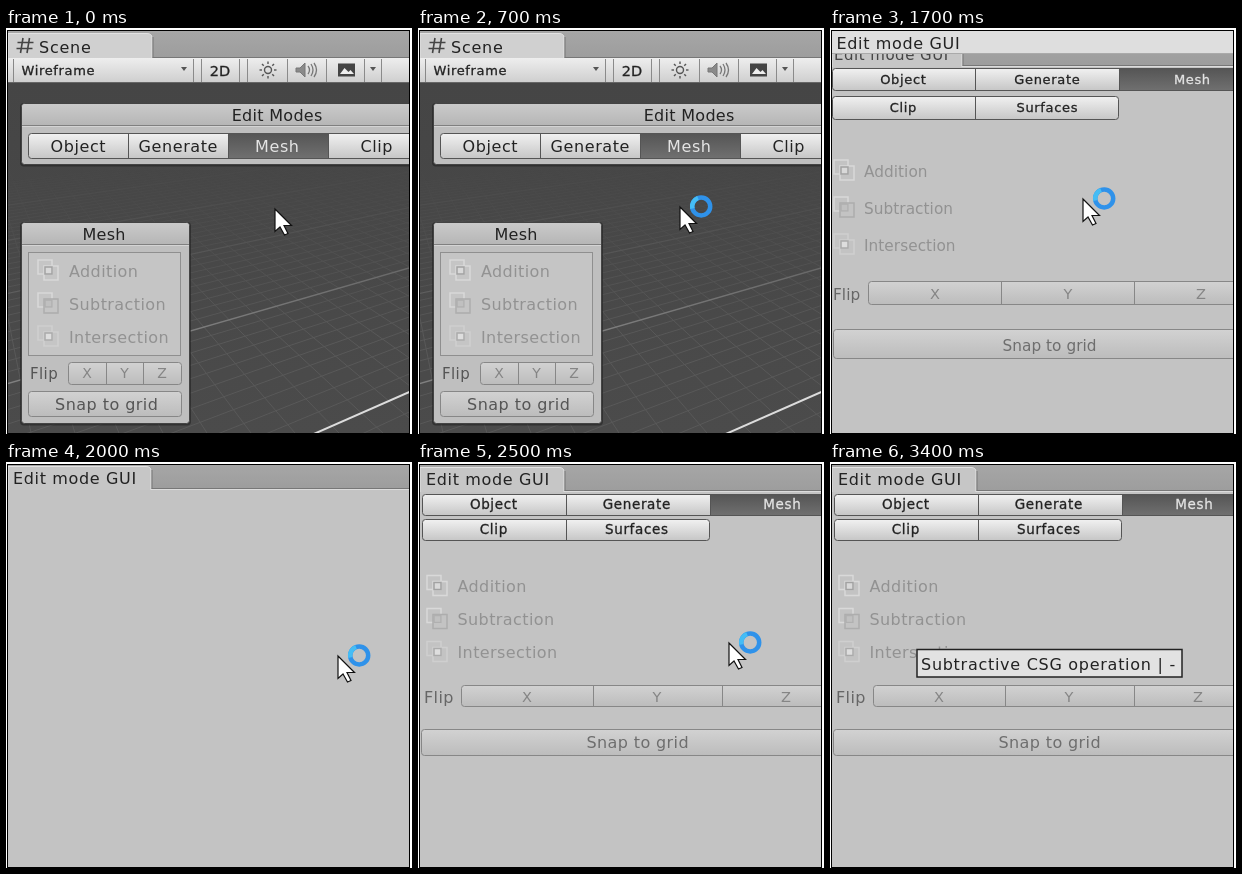
An HTML page for the animation above (3500 ms loop, 406 by 406 pixels).

```html
<!DOCTYPE html>
<html lang="en">
<head>
<meta charset="utf-8">
<title>Editor window</title>
<style>
html, body { margin: 0; width: 100%; height: 100%; overflow: hidden; background: #fff; }
svg { display: block; width: 100%; height: 100%; }
text { font-family: "DejaVu Sans", sans-serif; }
.heavy { stroke: currentColor; stroke-width: .3; }
</style>
</head>
<body>
<svg id="stage" viewBox="0 0 406 406"></svg>
<script>
const LOOP = 3500;

// Each step holds until the next: time, scene, cursor x, cursor y, busy ring
const steps = [
  [0, "panels", 269, 181, 0],
  [100, "panels", 267, 183, 0],
  [600, "panels", 267, 183, 1],
  [700, "panels", 262, 179, 1],
  [800, "view", 257, 175, 1],
  [900, "opening"],
  [1000, "window"],
  [1700, "stretched", 253, 171, 1],
  [1800, "stretched", 279, 179, 1],
  [1900, "stretched", 306, 186, 1],
  [2000, "blank", 332, 194, 1],
  [2300, "docked", 325, 190, 1],
  [2400, "docked", 318, 185, 1],
  [2500, "docked", 311, 181, 1],
  [2800, "docked", 329, 173, 1],
  [2900, "tooltip"]
];

const INK = "#222", DIM = "#929292", BODY = "#c3c3c3";

const rect = (x, y, r, b, fill, more = "") =>
  `<rect x="${x}" y="${y}" width="${r - x}" height="${b - y}" fill="${fill}" ${more}/>`;
const path = (d, stroke, width = 1, fill = "none") =>
  `<path d="${d}" fill="${fill}" stroke="${stroke}" stroke-width="${width}"/>`;

// y is the middle of the capital letters
function text(s, x, y, { size = 16, gap = .4, color = INK, anchor = "start", heavy = false } = {}) {
  const shift = anchor === "middle" ? gap / 2 : 0;
  return `<text x="${x + shift}" y="${y + size * .365}" font-size="${size}" letter-spacing="${gap}"
    fill="${color}" text-anchor="${anchor}" ${heavy ? `class="heavy" style="color:${color}"` : ""}>${s}</text>`;
}
const mid = (s, x, y, opts) => text(s, x, y, { ...opts, anchor: "middle" });

// Joined row of buttons; edges are the x positions of the borders
function buttons(edges, y, b, labels,
  { on = -1, off = false, ink = off ? "#858585" : INK, cy = (y + b) / 2, centers = [], ...font } = {}) {
  const x = edges[0], r = edges[edges.length - 1];
  const line = off ? "#878787" : "#555";
  let s = rect(x + .5, y + .5, r + .5, b + .5, off ? "url(#soft)" : "url(#button)", 'rx="3"');
  if (on >= 0) s += rect(edges[on], y + .5, edges[on + 1] + .5, b + .5, "url(#pressed)", 'rx="2"');
  edges.slice(1, -1).forEach(e => s += path(`M${e + .5} ${y + .5}V${b}`, line));
  s += rect(x + .5, y + .5, r + .5, b + .5, "none", `rx="3" stroke="${line}"`);
  labels.forEach((label, i) => {
    const cx = centers[i] ?? (edges[i] + edges[i + 1]) / 2;
    s += mid(label, cx, cy, { color: i === on ? "#e4e4e4" : ink, ...font });
  });
  return s;
}

// Two overlapping squares
function icon(x, y, kind) {
  const square = (p, size, stroke, fill = "none") =>
    rect(x + p, y + p, x + p + size, y + p + size, fill, `stroke="${stroke}" stroke-width="1.5"`);
  const [back, front, edge, core] = [
    ["#d9d9d9", "#d9d9d9", "#a2a2a2", "#d9d9d9"],
    ["#d9d9d9", "#adadad", "#b0b0b0", "#c0c0c0"],
    ["#cfcfcf", "#cfcfcf", "#ababab", "#dedede"]
  ][kind];
  return square(1, 14, back) + square(7, 14, front) + square(8, 7, edge, core);
}

const operations = (iconX, textX, ys, font) =>
  ["Addition", "Subtraction", "Intersection"].map((name, i) =>
    icon(iconX, ys[i] - 12, i) + text(name, textX, ys[i], { color: DIM, ...font })).join("");

const tab = (r, y, b, fill = "#c6c6c6") =>
  rect(2, 3, 403, b, "url(#tabs)") +
  path(`M2 ${b - .5}H403`, "#777") + path(`M${r} ${b + .5}H403`, "#dcdcdc") +
  path(`M2 ${b + 1}V${y + .5}H${r - 5}Q${r} ${y + .5} ${r} ${y + 5}V${b + 1}`, "#e2e2e2", 1, fill) +
  path(`M${r + 1} ${y + 4}V${b}`, "#777");

function grid() {
  const horizon = 5, low = 405;
  const ray = (vx, x, color, width = 1) =>
    path(`M${vx} ${horizon}L${x + (x - vx) * .2} ${low + (low - horizon) * .2}`, color, width);
  let s = "";
  for (let k = -6; k < 50; k++) {
    if (k % 10) s += ray(1219, 310 - 48 * k, "#595959");
  }
  for (let j = -4; j < 45; j++) s += ray(-55, 157 + 44 * j, "#595959");
  for (let k = 1; k < 5; k++) s += ray(1219, 310 - 480 * k, k === 1 ? "#808080" : "#666", 1.3);
  return `<g clip-path="url(#groundClip)"><g mask="url(#haze)">${s}${ray(1219, 310, "#dcdcdc", 2)}</g></g>`;
}

function toolbar() {
  let s = rect(2, 30, 403, 54, "url(#bar)") + path("M2 54.5H403", "#666") + path("M7.5 31V54", "#888");
  [187, 195, 233, 241, 281, 320, 358, 375].forEach(x => s += path(`M${x + .5} 31V54`, "#8a8a8a"));
  s += text("Wireframe", 15.5, 42, { size: 13, gap: .65, heavy: true });
  s += mid("2D", 214, 42.5, { size: 14.5, gap: .2, heavy: true });
  s += path("M175 39h6l-3 4z", "none", 0, "#555") + path("M364 39h6l-3 4z", "none", 0, "#555");
  s += `<circle cx="262" cy="42" r="3.5" fill="none" stroke="#555" stroke-width="1.4"/>`;
  for (let i = 0; i < 8; i++) s += `<path d="M262 36v-2.5" stroke="#555" stroke-width="1.4" transform="rotate(${i * 45} 262 42)"/>`;
  s += path("M290 40h4l5-5v14l-5-5h-4z", "#777", 1, "#8a8a8a") +
    path("M302 38q3 4 0 8M305 36q4 6 0 12M308 35q5 7 0 14", "#777", 1.3);
  s += rect(332, 35.5, 349, 48.5, "#444") + path("M334 46l4.5-6 4 4 2-2 3.5 4z", "none", 0, "#eee");
  return s;
}

function view() {
  let s = tab(146, 5, 30, "#d0d0d0") + text("Scene", 33, 19.5, { gap: .75 });
  s += path("M17 10L14.5 25M23.5 10L21 25M11.5 14.5H27.5M10.5 20.5H26.5", "#444", 1.6);
  return s + toolbar() + rect(2, 55, 403, 405, "url(#ground)") + grid();
}

function panel(x, y, r, b, title, cx) {
  return rect(x - 1, y, r + 1, b + 1.5, "#222", 'rx="4" opacity=".6"') +
    rect(x + .5, y + .5, r - .5, b - .5, "#bfbfbf", 'rx="3" stroke="#444"') +
    rect(x + 1, y + 1, r - 1, y + 22, "url(#title)", 'rx="3"') +
    path(`M${x + 1} ${y + 22.5}H${r - 1}`, "#808080") + path(`M${x + 1} ${y + 23.5}H${r - 1}`, "#d4d4d4") +
    mid(title, cx, y + 12.5, { gap: .3 });
}

function panels() {
  let s = panel(15, 75, 440, 137, "Edit Modes", 271);
  s += buttons([22, 122, 222, 322, 422], 105, 130, ["Object", "Generate", "Mesh", "Clip"],
    { on: 2, gap: .6, cy: 118, centers: [72, 172, 271, 370.5] });
  s += panel(15, 194, 184, 396, "Mesh", 98);
  s += rect(22.5, 224.5, 174.5, 327.5, "#c5c5c5", 'stroke="#8f8f8f"');
  s += operations(31, 63, [243, 276, 309]);
  s += text("Flip", 24, 346, { size: 15, color: "#555" });
  s += buttons([62, 100, 137, 175], 334, 356, ["X", "Y", "Z"], { off: true, size: 14 });
  s += buttons([22, 175], 363, 388, ["Snap to grid"], { off: true, ink: "#555", gap: .45, centers: [100.5], cy: 376.5 });
  return view() + `<g clip-path="url(#frame)">${s}</g>`;
}

function floating(full) {
  let s = rect(1, 46, 115, 405, BODY) + rect(1, 46, 115, 47, "#333") + rect(1, 47, 115, 57, "#fff");
  s += rect(1, 57, 115, 90, "url(#tabs)") + path("M1 90.5H115", "#8a8a8a") + path("M114.5 57V405", "#d2d2d2");
  s += rect(76.5, 64.5, 82.5, 69.5, "none", 'stroke="#333" stroke-width="2"');
  s += path("M94 62l10 10M104 62l-10 10", "#444", 1.3);
  s += path("M87 82h7l-3.5 4z", "none", 0, "#444") + path("M95 80.5h12M95 83.5h12M95 86.5h12", "#444", 1.3);
  if (full) {
    s += buttons([-20, 104], 91, 113, ["Mesh"], { on: 0, off: true, size: 14, gap: .8, centers: [27], cy: 102.5 });
    s += buttons([-20, 108], 284, 305, ["Z"], { off: true, size: 14, centers: [37.5] });
    s += buttons([-20, 108], 327, 353, [""], { off: true });
  }
  return view() + `<g clip-path="url(#left)">${s}</g>`;
}

// Mode buttons and tools of the edit window
function tools(o) {
  const small = { size: o.small, gap: .65, heavy: true };
  const [a, b, c] = o.cols;
  return `<g clip-path="url(#frame)">` +
    buttons([a, b, c, 440], ...o.row1, ["Object", "Generate", "Mesh"], { on: 2, centers: o.heads, ...small }) +
    buttons([a, b, c - 1], ...o.row2, ["Clip", "Surfaces"], { centers: o.heads, ...small }) +
    operations(o.iconX, o.textX, o.ys, o.font) +
    text("Flip", o.flipX, o.flipY, { color: "#666", ...o.font }) +
    buttons([o.flipL, ...o.splits, 440], ...o.flip, ["X", "Y", "Z"], { off: true, centers: o.axes, size: 14.5, cy: o.flipY }) +
    buttons([3, 440], ...o.snap, ["Snap to grid"], { off: true, ink: "#6e6e6e", centers: [219.5], cy: o.snapY, ...o.font }) +
    `</g>`;
}

const body = rect(2, 3, 403, 405, BODY);
const heading = (x, y) => text("Edit mode GUI", x, y, { gap: .65 });

function stretched() {
  const behind = tab(132, 16, 38) + text("Edit mode GUI", 4, 26.5, { size: 15, gap: .5, color: "#444" });
  return body + behind + rect(2, 3, 403, 25, "#dedede") + path("M2 25.5H403", "#aaa") + heading(6.5, 15) +
    tools({
      cols: [2, 145, 289], row1: [40, 62], row2: [68, 91], heads: [73, 217, 362], small: 13,
      iconX: 3, textX: 34, ys: [143, 180, 217], font: { size: 15.3, gap: .05 },
      flipX: 3, flipY: 266, flipL: 38, splits: [171, 304], flip: [253, 276], axes: [105, 238, 371],
      snap: [301, 330], snapY: 317
    });
}

const blank = () => body + tab(145, 4, 27) + heading(7, 16.5);

const docked = () => body + tab(146, 5, 29) + heading(8, 17.5) +
  tools({
    cols: [4, 148, 292], row1: [32, 53], row2: [57, 78], heads: [75.5, 218.5, 364], small: 13.5,
    iconX: 8, textX: 39.5, ys: [124.5, 157.5, 190.5], font: { size: 16, gap: .4 },
    flipX: 6, flipY: 235, flipL: 43, splits: [175, 304], flip: [223, 244], axes: [109, 239, 368],
    snap: [267, 293], snapY: 280.5
  });

const tooltip = () => docked() +
  rect(87, 187.5, 352, 215, "#e2e2e2", 'stroke="#222" stroke-width="1.5"') +
  text("Subtractive CSG operation | -", 91, 202.5, { gap: .72 });

const shade = (id, top, bottom) =>
  `<linearGradient id="${id}" x2="0" y2="1"><stop stop-color="${top}"/><stop offset="1" stop-color="${bottom}"/></linearGradient>`;
const clip = (id, ...box) => `<clipPath id="${id}">${rect(...box, "#fff")}</clipPath>`;

const defs = `<defs>` +
  shade("button", "#f1f1f1", "#c6c6c6") + shade("soft", "#d2d2d2", "#bcbcbc") +
  shade("pressed", "#555", "#707070") + shade("bar", "#eee", "#cfcfcf") +
  shade("tabs", "#a6a6a6", "#9d9d9d") + shade("title", "#cacaca", "#b6b6b6") +
  shade("ground", "#454545", "#4b4b4b") +
  clip("groundClip", 2, 55, 403, 405) + clip("frame", 2, 3, 403, 405) + clip("left", 1, 46, 115, 405) +
  `<linearGradient id="fade" gradientUnits="userSpaceOnUse" x1="0" y1="130" x2="0" y2="310">
    <stop stop-color="#000"/><stop offset=".45" stop-color="#666"/><stop offset="1" stop-color="#fff"/></linearGradient>
  <mask id="haze" maskUnits="userSpaceOnUse" x="0" y="0" width="406" height="406">${rect(0, 0, 406, 406, "url(#fade)")}</mask>
  </defs>`;

const scenes = {
  panels, view, stretched, blank, docked, tooltip,
  opening: () => floating(false),
  window: () => floating(true)
};

const border = rect(1.5, 2.5, 403.5, 405.5, "none", 'stroke="#000"');
const floats = ["opening", "window"];
const stage = document.getElementById("stage");
stage.innerHTML = defs +
  Object.entries(scenes).map(([name, draw]) =>
    `<g id="scene-${name}" display="none">${floats.includes(name) ? border + draw() : draw() + border}</g>`).join("") +
  `<g id="cursor">
    <path d="M0 0V22.5L5 18L9.5 26L13 24.5L9 16.5H16.5Z" fill="#fff" stroke="#111" stroke-width="1.2"/>
    <g id="ring" fill="none" stroke-width="4.5">
      <circle cx="21.2" cy="-.6" r="9" stroke="#2f92ea"/>
      <path d="M12.4 1.4A9 9 0 0 1 18 -9" stroke="#45bdf5"/>
    </g>
  </g>`;

const cursor = document.getElementById("cursor");
const ring = document.getElementById("ring");
const show = (el, on) => el.setAttribute("display", on ? "inline" : "none");
const start = performance.now();
let current = null;

function play(now) {
  const t = Math.max(0, now - start) % LOOP;
  const step = steps.findLast(s => s[0] <= t);
  if (step !== current) {
    const [, scene, x, y, busy] = step;
    for (const name in scenes) show(document.getElementById(`scene-${name}`), name === scene);
    show(cursor, x !== undefined);
    show(ring, busy);
    if (x !== undefined) cursor.setAttribute("transform", `translate(${x} ${y})`);
    current = step;
  }
  requestAnimationFrame(play);
}
play(start);
</script>
</body>
</html>
```
